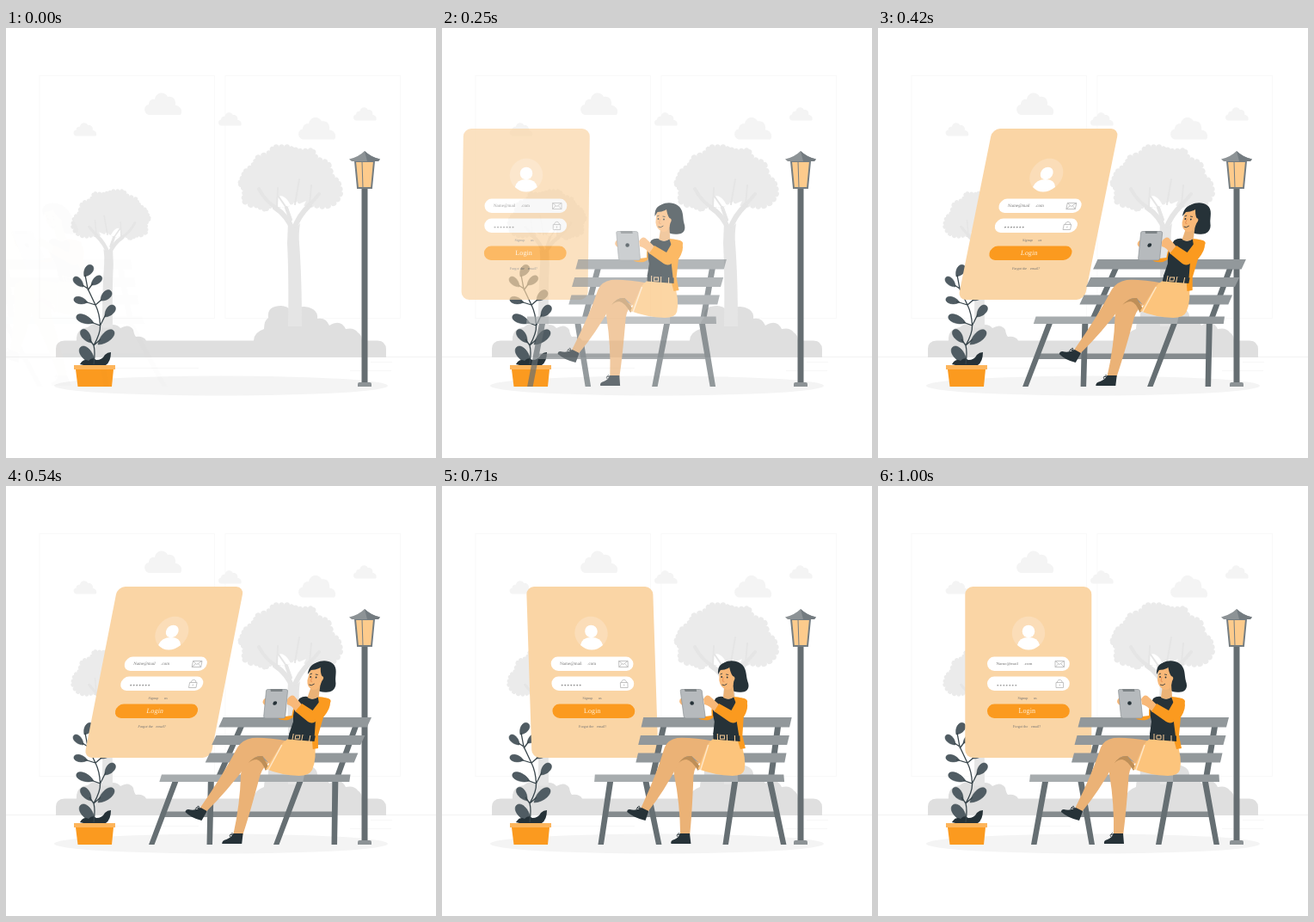
An HTML page that plays this animation: 500 by 500 pixels, repeating every 1.04 s.

```html
<!DOCTYPE html>
<html lang="en">
<head>
<meta charset="utf-8">
<title>Login on a park bench</title>
<style>
  html, body { margin: 0; width: 100%; height: 100%; overflow: hidden; background: #fff; }
  svg { display: block; width: 100%; height: 100%; }
  text { font-family: "Liberation Serif", serif; font-size: 5px; fill: #737373; }
  .small { font-size: 4.2px; }
</style>
</head>
<body>
<svg viewBox="0 0 500 500">
  <defs>
    <path id="cloud" fill="#f4f4f4" d="M5 26C-1 25-2 15 5 14C5 9 9 7 12 8C13-1 24-2 27 5C33 4 37 8 36 15C42 15 45 22 42 26Z"/>
    <g id="tree">
      <path id="crown" fill="#ebebeb"/>
      <path fill="#fff" d="M316 196Q322 193 328 201L331 206L326 209L316 208ZM340 205L349 201L345 209L337 220Z"/>
      <g fill="none" stroke="#e5e5e5" stroke-linecap="round">
        <path stroke-width="6" d="M313 209Q327 218 334 236Q340 218 353 206"/>
        <path stroke-width="4" d="M294 187Q302 202 314 209M352 207L364 193M331 223L326 209"/>
        <path stroke-width="2" d="M315 208L316 186M336 205L341 176M353 205L355 183M326 209L317 196"/>
      </g>
      <path fill="#e5e5e5" d="M328 226Q335 236 342 227Q340 240 341 250Q344 290 344 347H328Q329 290 327 250Z"/>
    </g>
  </defs>

  <g fill="none" stroke="#f9f9f9">
    <rect x="39" y="55.500" width="203.500" height="282"/>
    <rect x="255" y="55.500" width="203.500" height="282"/>
    <path stroke="#f3f3f3" d="M0 382.500H500"/>
    <path stroke="#f7f7f7" d="M120 395.500H224M424 388.500H449M400 398.500H448"/>
  </g>
  <use href="#cloud" x="161" y="75"/>
  <use href="#cloud" x="340" y="103.500"/>
  <use href="#cloud" transform="translate(78.500 110)scale(.62 .6)"/>
  <use href="#cloud" transform="translate(247 98)scale(.62 .6)"/>
  <use href="#cloud" transform="translate(404 92)scale(.62 .6)"/>
  <path fill="#dfdfdf" d="M58 383V373Q58 364 68 363.500H82Q81 350 95 348Q104 340 115 347Q128 342 133 349Q143 343 148 351Q149 357 151 359Q160 358 163 363.500H288Q288 354 300 350Q300 340 305 337Q303 323 320 323Q327 323 332 329Q346 320 357 327Q363 331 362 338Q372 336 376 346Q389 338 395 350Q405 348 409 354Q414 357 414 363.500H432Q442 364 442 374V383Z"/>
  <use href="#tree"/>
  <use href="#tree" transform="matrix(-.762 0 0 .762 374 84.100)"/>
  <ellipse cx="250" cy="416" rx="194" ry="11.500" fill="#f4f4f4"/>

  <g id="plant">
    <path fill="#263238" d="M86 391Q90 384 96 387Q100 382 105 386Q112 386 115 380Q118 377 122 377Q122 388 116 392H90Z"/>
    <path fill="none" stroke="#37444a" stroke-width="1.300" d="M102 391Q104 377 102 369Q110 355 109.500 346Q109 332 104 322L95 303L92 287M95 303L89 299M95 305L101 297M104 322L91 318M104 322L111 316M109.500 346L99 342M109.500 346L116 333M102 369L97 362M102 369L110 362"/>
    <path fill="#fdb55c" d="M79 392H127V397H79Z"/>
    <path fill="#fb9a1f" d="M81 397H125L123 417H83.500Z"/>
  </g>

  <path fill="#666e72" d="M413.500 186H420.500V413H413.500Z"/>
  <path fill="#8d9396" d="M409 417V414Q409 412 411 412H423Q425 412 425 414V417Z"/>
  <path fill="#fdcb8c" stroke="#757d81" stroke-width="2" d="M406 155H428L425 186H409Z"/>
  <path fill="none" stroke="#757d81" d="M414 155L415 186"/>
  <path fill="#8d9396" d="M399 152.500Q410 150 417 143Q424 150 435 152.500L433 155H402Z"/>
  <path fill="#737b80" d="M417 143Q424 150 435 152.500L433 155H420Z"/>

  <g id="panel">
    <rect x="101.300" y="117" width="147" height="199" rx="9" fill="#fad5a5"/>
    <circle cx="175" cy="171" r="19.200" fill="#fbddb8"/>
    <g fill="#fff">
      <circle cx="175" cy="169" r="7.300"/>
      <path d="M162 185Q164 176 175 176Q186 176 188 185Q182 190.500 175 190.500Q168 190.500 162 185Z"/>
      <rect x="127" y="198.500" width="95.800" height="16.500" rx="8.250"/>
      <rect x="127" y="221.500" width="95.800" height="16.500" rx="8.250"/>
    </g>
    <rect x="127" y="253.500" width="95.800" height="16.500" rx="8.250" fill="#fb9a1f"/>
    <g fill="none" stroke="#b5b5b5" stroke-width=".8">
      <path d="M206 203.500H216.500V210.500H206ZL211 207.500L216.500 203.500M206 210.500L209.500 207M216.500 210.500L213 207"/>
      <path d="M207 228.500H215.500V234.500H207ZM208.500 228.500V227Q211.250 223.500 214 227V228.500M211.250 230.500V232.500"/>
    </g>
    <text x="137.500" y="208.300">Name@mail</text>
    <text x="169.500" y="208.300">.com</text>
    <text x="138" y="234" letter-spacing="1" font-weight="bold">*******</text>
    <text class="small" x="162.500" y="248">Signup</text>
    <text class="small" x="181" y="248">us</text>
    <text x="163.500" y="264.300" style="font-size:8px;letter-spacing:.1px;fill:#fff3df">Login</text>
    <text class="small" x="157" y="281">Forgot the</text>
    <text class="small" x="178" y="281">email?</text>
  </g>

  <g id="bench">
    <path fill="#666f73" d="M255 280H262L247 340H240ZM388 280H395L385 340H378Z"/>
    <path fill="#858b8e" d="M190 378.500H388V385H190Z"/>
    <path fill="#666f73" d="M191 344H198L184.500 417H178ZM232.500 344H239.500L252 417H245.500ZM336 344H343L329.500 417H323ZM377 344H384L397 417H390.500Z"/>
    <path fill="#92989b" d="M235.500 269H408L405 280.500H232.500ZM231.500 290H404.500L401.500 301H228.500ZM228 310.500H400.500L398 321.500H225ZM340 335.500H396.500L397 344H340Z"/>
    <path fill="#a7acae" d="M177 335.500H343V344H176Z"/>

    <path fill="#ebb276" d="M269 325Q278 309 299 322Q291 328 291 345Q288 385 285 406H274Q275 370 269 335Z"/>
    <path fill="#ebb276" d="M318 297Q290 292 274 293Q263 295 259 304Q249 335 229.500 374L237 379Q257 355 275 322Q281 313 290 314L301 324Z"/>
    <path fill="#be8f58" d="M275 322Q281 313 290 314L300 327L297 331Q290 319 284 318Q279 318 275 322Z"/>
    <path fill="#263238" d="M230 374L238 378Q236 384 234 389Q221 386 213 379Q213 376 216 376Q224 378 230 374ZM274 404H285L286 416H263Q262 412 267 411Q272 409 274 404Z"/>
    <path fill="none" stroke="#263238" stroke-width=".9" d="M229 375Q222 373 225 377M228 375Q228 370 225 374M274 406Q268 404 271 408M274 406Q273 402 271 405"/>
    <path fill="#fcc47c" d="M316 294L347 296Q354 317 351 330Q349 337 337 337Q315 336 297 329L309 301Q311 297 316 294Z"/>
    <path fill="none" stroke="#fee6c7" stroke-width="1.500" d="M310 301L300 330"/>

    <path fill="#fb9a1f" d="M320 248Q314 255 315 267L299 269Q301 273 312 272Q321 269 323 254ZM341 245Q353 245 356 251Q359 258 352 269L350 290L353 305L347 306L340 280Z"/>
    <path fill="#263238" d="M320 247Q324 244 329 245Q335 250 341 245Q347 258 344 275L346 291L316 288L318 274Q314 259 320 247Z"/>
    <path fill="#263238" d="M316 287.500L347 290.500V297L316 294.500Z"/>
    <path fill="none" stroke="#fcd09a" d="M321 288V295M332 289V296M341 290V297M324 290H329V294H324Z"/>
    <path fill="#263238" d="M326 212C329 203 342 201 350 206C358 211 356 220 358 227C361 235 357 239 352 239.500C346 240.500 341 239 339 237Z"/>
    <path fill="#ebb276" d="M331 232L341 230L342 245Q336 250 329 246Z"/>
    <path fill="#f8b878" d="M326 213Q333 213 337 208Q338 217 341 221Q345 222 342 227Q341 237 334 237Q326 235 325 226Z"/>
    <path fill="#263238" d="M324 219Q323 206 335 205L341 207Q337 214 327 214Z"/>
    <path fill="none" stroke="#263238" stroke-width=".8" d="M326.500 219L329 218M333 219L336 219.500M328 231Q331 233 334 230"/>
    <g fill="#263238"><circle cx="328" cy="222" r=".9"/><circle cx="334.500" cy="222.500" r=".9"/></g>
    <path fill="none" stroke="#e58b52" stroke-width=".8" d="M330 222L329 227L331 227.500"/>

    <path fill="#f8b878" d="M284 246Q278 246 278 251Q279 255 285 256Z"/>
    <path fill="#b6babd" stroke="#8d9396" stroke-width=".7" d="M281 236.500H302Q304 236.500 304.500 238L307.500 268Q307.500 270 306 270H285Q283 270 282.500 268L279.500 238Q279.500 236.500 281 236.500Z"/>
    <path fill="#7d8386" d="M284 236H298L298.500 239H285Z"/>
    <circle cx="292.500" cy="252.500" r="2.300" fill="#263238"/>
    <path fill="#f8b878" d="M306 248Q309 242 313 244L325 255L319 263Q313 255 307 254Z"/>
    <path fill="#fb9a1f" d="M346 247Q355 245 357 250Q357 259 348 271Q341 278 335 274L318 262L324 253L338 261Z"/>
  </g>
</svg>
<script>
const $ = id => document.getElementById(id);

// Leafy crown: small scallops along a coarse outline
const outline = [[270,181],[276,167],[285,160],[290,152],[303,147],[311,138],[330,138],[345,142],[357,141],[362,152],[374,156],[378,170],[387,178],[390,190],[384,202],[371,208],[352,205],[339,200],[326,208],[310,207],[302,213],[288,207],[275,200],[276,189]];
let crown = "M" + outline[0];
outline.forEach(([x, y], i) => {
  const [u, v] = outline[(i + 1) % outline.length];
  const n = Math.max(2, Math.round(Math.hypot(u - x, v - y) / 6));
  for (let j = 1; j <= n; j++)
    crown += `A3.200 3.200 0 0 1 ${x + (u - x) * j / n} ${y + (v - y) * j / n}`;
});
$("crown").setAttribute("d", crown + "Z");

// Leaves: base point, tip, half width
const leaves = [[91,289,100,276,7],[90,301,79,290,6],[99,299,111,289,6],[95,319,79,315,6],[110,317,122,306,7],[102,343,82,335,7],[115,336,126,323,7],[99,366,88,351,7],[107,368,125,352,8],[103,391,87,371,9]];
for (const [x, y, u, v, w] of leaves) {
  const leaf = document.createElementNS("http://www.w3.org/2000/svg", "path");
  const len = Math.hypot(u - x, v - y), nx = (y - v) / len * w, ny = (u - x) / len * w;
  const low = s => `${x + (u - x) * .4 + nx * s} ${y + (v - y) * .4 + ny * s}`;
  const high = s => `${u + nx * s * .8} ${v + ny * s * .8}`;
  leaf.setAttribute("d", `M${x} ${y}C${low(1)} ${high(1)} ${u} ${v}C${high(-1)} ${low(-1)} ${x} ${y}Z`);
  leaf.setAttribute("fill", "#505c63");
  leaf.setAttribute("stroke", "#37444a");
  leaf.setAttribute("stroke-width", ".5");
  $("plant").prepend(leaf);
}

// cubic-bezier(.36, -.01, .5, 1.38)
const bezier = (u, a, b) => 3 * (1 - u) ** 2 * u * a + 3 * (1 - u) * u * u * b + u ** 3;
function ease(x) {
  let lo = 0, hi = 1;
  for (let i = 0; i < 30; i++) {
    const m = (lo + hi) / 2;
    if (bezier(m, .36, .5) < x) lo = m; else hi = m;
  }
  return bezier(lo, -.01, 1.38);
}

function pose(ms) {
  if (ms < 600) {
    const p = ease(ms / 600);
    return { dx: 250 * (p - 1), skew: 20 - 30 * p, alpha: Math.min(1, Math.max(0, p)) };
  }
  const skew = ms < 800 ? -10 + 12 * ease((ms - 600) / 200)
    : ms < 1000 ? 2 - 2 * ease((ms - 800) / 200) : 0;
  return { dx: 0, skew, alpha: 1 };
}

function place(id, centerY, { dx, skew, alpha }) {
  const k = Math.tan(skew * Math.PI / 180);
  $(id).setAttribute("transform", `matrix(1 0 ${k} 1 ${dx - centerY * k} 0)`);
  $(id).setAttribute("opacity", alpha);
}

const start = performance.now();
function draw() {
  const ms = Math.max(0, performance.now() - start) % 1040;
  const step = Math.floor(ms * .024 + .125); // 24 pictures per second
  const tick = Math.floor(step * 2.5) + 2;   // on a clock of 60 ticks per second
  const now = pose(tick * 1000 / 60);
  place("panel", 216.5, now);
  place("bench", 310, now);
  requestAnimationFrame(draw);
}
draw();
</script>
</body>
</html>
```
